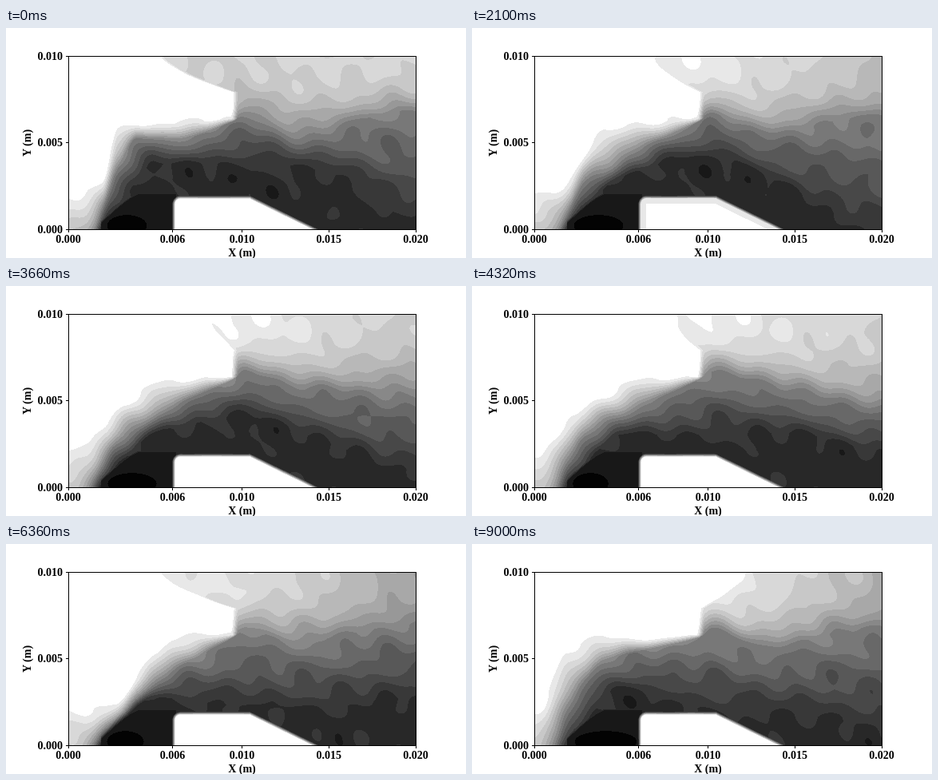
Recreate the animation shown at these times as an HTML page with a canvas. Size 576 by 288 pixels, loop 9.06 s.

```html
<!DOCTYPE html>
<html lang="en">
<head>
<meta charset="utf-8">
<title>Contour plot</title>
<style>
html, body { margin: 0; width: 100%; height: 100%; overflow: hidden; background: #fff; }
canvas, svg { position: absolute; left: 0; top: 0; width: 576px; height: 288px; }
text { font: bold 14px "Liberation Serif", "Times New Roman", serif; text-anchor: middle; }
</style>
</head>
<body>
<canvas id="plot" width="576" height="288"></canvas>
<svg id="axes" viewBox="0 0 576 288"></svg>
<script>
const LOOP = 9060, STEP = 60;
const BOX = { x: 78, y: 35, w: 435, h: 217 };
const clamp = (v, lo = 0, hi = 1) => Math.min(hi, Math.max(lo, v));
const mix = (a, b, k) => a + (b - a) * k;
const smoothstep = (lo, hi, v) => { const u = clamp((v - lo) / (hi - lo)); return u * u * (3 - 2 * u); };

// rim, mid, core: heights where the plume turns light, grey and dark, from left to right.
// sky: tone at the top, left and right. front: where the sky tone starts.
// pool: half width of the black inlet. wake: tone left inside the solid body.
const poses = [
  { at: 0, rim: [192, 128, 119], mid: [137, 139, 133, 102], core: [170, 168, 180, 238], sky: [3, 2.7], front: 195, pool: 28, wake: 0 },
  { at: 1200, rim: [198, 150, 121], mid: [180, 152, 128, 105], core: [190, 176, 195, 255], sky: [1.7, 4.5], front: 192, pool: 26, wake: 3 },
  { at: 3000, rim: [187, 168, 134], mid: [181, 150, 131, 114], core: [184, 142, 207, 255], sky: [.9, 3.9], front: 253, pool: 44, wake: 0 },
  { at: 4320, rim: [168, 150, 136], mid: [174, 150, 120, 150], core: [186, 186, 184, 205], sky: [1, 3.1], front: 245, pool: 25, wake: 0 },
  { at: 6360, rim: [208, 198, 165], mid: [191, 158, 122, 100], core: [192, 203, 204, 192], sky: [1.7, 5.7], front: 192, pool: 26, wake: 0 },
  { at: 7680, rim: [202, 185, 122], mid: [186, 140, 128, 118], core: [198, 212, 205, 230], sky: [.7, 3], front: 392, pool: 43, wake: 3 },
  { at: 9000, rim: [133, 124, 118], mid: [146, 134, 128, 103], core: [178, 208, 212, 228], sky: [.7, 5], front: 340, pool: 44, wake: 0 }
];

const blend = (a, b, k) => Array.isArray(a) ? a.map((v, i) => mix(v, b[i], k)) : mix(a, b, k);

function poseAt(time) {
  const next = Math.max(1, poses.findIndex(p => p.at >= time));
  const a = poses[next - 1], b = poses[next], k = (time - a.at) / (b.at - a.at);
  return Object.fromEntries(Object.keys(a).map(key => [key, blend(a[key], b[key], k)]));
}

// Monotone cubic through [x, y] points, sampled once per pixel column.
function curve(points) {
  const last = points.length - 1, slopes = [];
  for (let i = 0; i < last; i++) {
    slopes.push((points[i + 1][1] - points[i][1]) / (points[i + 1][0] - points[i][0]));
  }
  const tangents = points.map((_, i) => {
    const a = slopes[i - 1], b = slopes[i];
    return i && i < last && a * b > 0 ? 2 * a * b / (a + b) : 0;
  });
  let i = 0;
  return Float32Array.from({ length: BOX.w }, (_, column) => {
    const x = BOX.x + column;
    while (i < last - 1 && x > points[i + 1][0]) i++;
    const [x0, y0] = points[i], [x1, y1] = points[i + 1];
    const w = x1 - x0, u = clamp((x - x0) / w), r = 1 - u;
    return (1 + 2 * u) * r * r * y0 + u * r * r * w * tangents[i]
      + u * u * (3 - 2 * u) * y1 - u * u * r * w * tangents[i + 1];
  });
}

function plumeCurves({ rim, mid, core }) {
  return {
    rim: curve([[80, 208], [120, rim[0]], [140, rim[1]], [165, rim[2]], [210, 119], [283, 113]]),
    mid: curve([[80, 300], [120, mix(rim[0], 252, .6)], [140, mix(rim[1], 252, .38)], [165, mid[0]],
      [210, mid[1]], [283, 117], [300, 107], [360, mid[2]], [513, mid[3]]]),
    core: curve([[80, 340], [120, 247], [140, 225], [185, core[0]], [300, core[1]], [400, core[2]], [513, core[3]]])
  };
}

function plumeLevel(x, y, rim, mid, core, pose) {
  const floor = Math.max(core, mid + 3);
  if (y > floor) return 13 + Math.min(.4, (y - floor) * .02);
  if (y > mid) return mix(8, 13, (y - mid) / (floor - mid));
  const front = mix(pose.front, 286, clamp((y - BOX.y) / 45) ** 1.5);
  const inSky = smoothstep(front - 5, front + 5, x);
  const edge = Math.min(rim, mid - 1);
  const left = y < edge ? Math.max(0, 1 - (edge - y) * .08) : 1 + 7 * ((y - edge) / (mid - edge)) ** 1.3;
  const sky = mix(pose.sky[0], pose.sky[1], clamp((x - 290) / 223));
  const right = mix(sky, 8, clamp((y - BOX.y) / (mid - BOX.y)) ** 2.8);
  return mix(left, right, inSky);
}

// Black wedge at the inlet, with its darkest pool on the floor.
function inletLevel(x, y, pool) {
  if (x > 212) return 0;
  const gap = y - 208 - Math.max(0, 165 - x) ** 1.3 * .25;
  const d = ((x - 123 - pool) / pool) ** 2 + ((y - 247) / 15) ** 2;
  return 14 + Math.min(.35, gap * .8) - Math.max(0, 119 - x) * 3 + 1.2 * Math.exp(-d * d);
}

// Distance to the solid body on the floor, negative inside.
function bodyDistance(x, y) {
  if (x < 218 && y < 220) return Math.hypot(x - 218, y - 220) - 9;
  const top = 211 + Math.max(0, x - 305) * .49;
  return Math.max(209 - x, (top - y) * (x > 305 ? .9 : 1));
}

// Seeded waves that drift downstream and break the contours into islands.
let seed = 11;
const random = () => (seed = seed * 16807 % 2147483647) / 2147483647;
const waves = Array.from({ length: 6 }, () => {
  const angle = mix(-1.3, 1.3, random()), k = 2 * Math.PI / mix(28, 75, random());
  return { kx: k * Math.cos(angle), ky: k * Math.sin(angle), phase: random() * 6.28 };
});
function eddies(x, y, time) {
  let sum = 0;
  for (const { kx, ky, phase } of waves) sum += Math.sin(kx * (x - time * .03) + ky * y + phase);
  return sum * .19;
}

const context = document.getElementById("plot").getContext("2d");
const image = context.createImageData(BOX.w, BOX.h);
const pixels = new Uint32Array(image.data.buffer);
const shades = Array.from({ length: 16 }, (_, n) => {
  const grey = n === 0 ? 255 : n === 15 ? 3 : 248 - 16 * n;
  return (255 << 24 | grey << 16 | grey << 8 | grey) >>> 0;
});

function draw(time) {
  const pose = poseAt(time), { rim, mid, core } = plumeCurves(pose);
  for (let j = 0; j < BOX.h; j++) for (let i = 0; i < BOX.w; i++) {
    const x = i + BOX.x, y = j + BOX.y, gap = bodyDistance(x, y);
    let level = 0;
    if (gap > -2.5) {
      level = plumeLevel(x, y, rim[i], mid[i], core[i], pose);
      level += eddies(x, y, time) * clamp(level);
      level = Math.max(level, inletLevel(x, y, pose.pool)) * clamp((gap + 2.5) / 4);
    }
    if (gap < 2) level = Math.max(level, pose.wake * (1 + Math.min(0, gap) / 24));
    pixels[j * BOX.w + i] = shades[clamp(Math.floor(level), 0, 15)];
  }
  context.putImageData(image, BOX.x, BOX.y);
}

function drawAxes() {
  const label = (x, y, s, extra = "") => `<text x="${x}" y="${y}" ${extra}>${s}</text>`;
  let lines = `<rect x="78.5" y="35.5" width="435" height="217"/>`;
  let labels = label(295.5, 286, "X (m)") + label(0, 0, "Y (m)", `transform="translate(31 144) rotate(-90)"`);
  for (const value of [0, .006, .01, .015, .02]) {
    const x = BOX.x + BOX.w * value / .02;
    lines += `<path d="M${Math.floor(x) + .5} 252v4"/>`;
    labels += label(x, 269, value.toFixed(3));
  }
  for (const value of [0, .005, .01]) {
    const y = Math.floor(BOX.y + BOX.h * (1 - value / .01));
    lines += `<path d="M75 ${y + .5}h4"/>`;
    labels += label(71, y + 5, value.toFixed(3), `style="text-anchor:end"`);
  }
  document.getElementById("axes").innerHTML = `<g fill="none" stroke="#000">${lines}</g>${labels}`;
}

const start = performance.now();
let shown = -1;
function tick() {
  const time = Math.floor(Math.max(0, performance.now() - start) % LOOP / STEP) * STEP;
  if (time !== shown) draw(shown = time);
  requestAnimationFrame(tick);
}
drawAxes();
tick();
</script>
</body>
</html>
```
